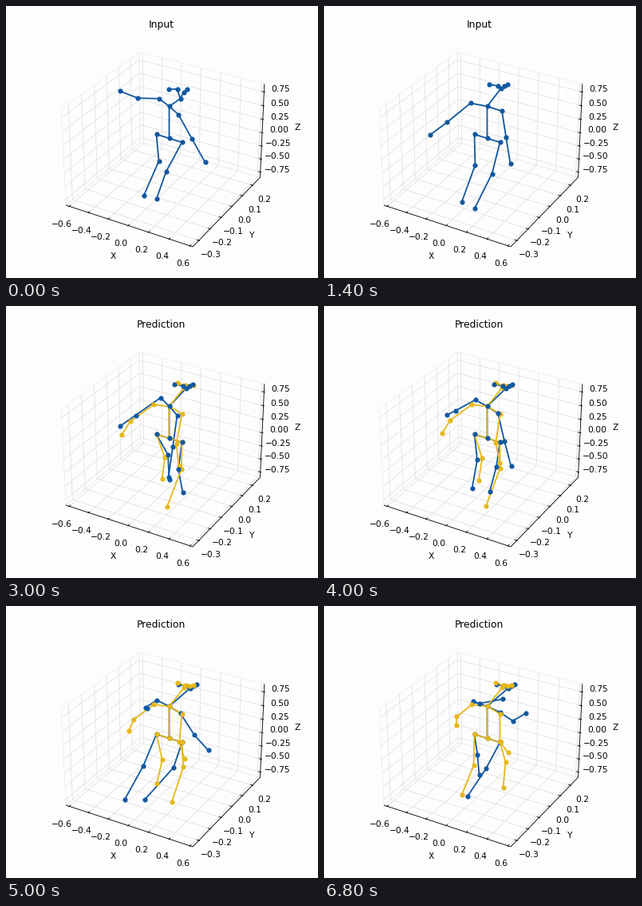
Recreate the animation shown at these times as a matplotlib script. Size 391 by 340 pixels, loop 7 s.

```python
import numpy as np
import matplotlib.pyplot as plt
from matplotlib.animation import FuncAnimation

W, H, DPI = 391, 340, 64
PT = 72 / DPI  # points per pixel
FRAMES, INTERVAL = 35, 200
FORECAST = 2.0  # seconds until the prediction starts
END = 6.8
SWAP = 4.4  # from here the predicted joints lie in front

BLUE, YELLOW = "#1158a0", "#e6b81a"
GRID, EDGE = "#e2e2e2", "#eeeeee"

plt.rcParams["font.family"] = "DejaVu Sans"
fig = plt.figure(figsize=(W / DPI, H / DPI), dpi=DPI, facecolor="#fdfdfd")
ax = fig.add_axes([0, 0, 1, 1])
ax.set_xlim(0, W)
ax.set_ylim(H, 0)
ax.axis("off")

# ---- perspective box ----
LIMITS = np.array([(-0.635, 0.625), (-0.352, 0.278), (-0.854, 0.896)])
HALF = np.array([0.5952, 0.5952, 0.4464])
elev, azim, DIST = np.radians(30), np.radians(-60), 10
TOWARD = np.array([np.cos(elev) * np.cos(azim), np.cos(elev) * np.sin(azim), np.sin(elev)])
RIGHT = np.array([-np.sin(azim), np.cos(azim), 0])
UP = np.cross(TOWARD, RIGHT)


def project(p):
    """Box coordinates in -1..1 to stage pixels."""
    q = np.asarray(p) * HALF
    k = 153 * DIST / (DIST - q @ TOWARD)
    return np.array([199 + k * (q @ RIGHT), 173.4 - k * (q @ UP)])


def segment(a, b, color, z):
    (x0, y0), (x1, y1) = project(a), project(b)
    ax.plot([x0, x1], [y0, y1], color=color, lw=0.85 * PT, zorder=z,
            solid_capstyle="butt")


def label(x, y, text):
    """Text centred on x, with its digits centred on y."""
    ax.text(x, y + 4, text, fontsize=10.6 * PT, ha="center", va="baseline")


def place(axis, value, others):
    return np.insert(np.array(others, float), axis, value)


# free axis, values, format, wall corners, tick direction, label offset
AXES = [
    (0, np.arange(-3, 4) * 0.2, ".1f", [(-1, -1), (1, -1), (1, 1)], 1, (-9, 21.3)),
    (1, np.arange(-3, 3) * 0.1, ".1f", [(1, -1), (-1, -1), (-1, 1)], 0, (15.4, 16.6)),
    (2, np.arange(-3, 4) * 0.25, ".2f", [(1, 1), (-1, 1), (-1, -1)], 0, (21, -4)),
]


def draw_axis(axis, values, fmt, walls, tick_dir, offset):
    lo, hi = LIMITS[axis]
    for a, b in zip(walls, walls[1:]):
        for end in (-1, 1):
            segment(place(axis, end, a), place(axis, end, b), EDGE, 1)
    segment(place(axis, -1, walls[0]), place(axis, 1, walls[0]), "black", 3)
    for v in values:
        points = [place(axis, 2 * (v - lo) / (hi - lo) - 1, c) for c in walls]
        for a, b in zip(points, points[1:]):
            segment(a, b, GRID, 2)
        inner, outer = points[0].copy(), points[0].copy()
        inner[tick_dir] *= 0.966
        outer[tick_dir] *= 1.017
        segment(inner, outer, "black", 3)
        label(*(project(points[0]) + offset), format(v, fmt).replace("-", "\u2212"))


for spec in AXES:
    draw_axis(*spec)
label(134, 312, "X")
label(308, 286, "Y")
label(365, 151, "Z")
title = ax.text(194.3, 27.2, "", fontsize=12.4 * PT, ha="center", va="baseline")

# ---- motion ----
BONES = [
    ("earR", "eyeR"), ("eyeR", "nose"), ("nose", "eyeL"), ("eyeL", "earL"),
    ("neck", "nose"), ("neck", "shoulderR"), ("shoulderR", "elbowR"),
    ("elbowR", "wristR"), ("neck", "shoulderL"), ("shoulderL", "elbowL"),
    ("elbowL", "wristL"), ("neck", "root"), ("root", "hipR"), ("root", "hipL"),
    ("hipR", "kneeR"), ("kneeR", "ankleR"), ("hipL", "kneeL"), ("kneeL", "ankleL"),
]
TORSO = {"neck": (205, 126), "root": (205, 166), "hipR": (189, 161), "hipL": (221, 171)}
LIMBS = [("shoulder", "elbow", "wrist"), ("hip", "knee", "ankle")]
HEAD = ["earR", "eyeR", "nose", "eyeL", "earL"]
NOD = np.array([6, 4, 13, 8, 6])  # how far each head joint dips at first

# key points of the hands and feet
TIMES = [0, 1.4, 3, 4, 5, 5.8, END]
SWINGS = {
    "wristR": [(143, 107), (133, 162), (143, 151), (154, 137), (177, 129), (202, 130), (224, 117)],
    "wristL": [(250, 196), (234, 198), (204, 215), (235, 201), (254, 181), (249, 162), (253, 135)],
    "ankleR": [(173, 238), (173, 246), (205, 218), (186, 229), (149, 243), (150, 241), (195, 212)],
    "ankleL": [(189, 242), (189, 254), (222, 234), (208, 233), (174, 243), (162, 250), (180, 239)],
}
TWIST = [-0.4, 1, -0.7, 0, 0.1, 0.3, 0.5]
KNEE = [-4, 6, -5, 2, 13, 14, 3]

# predicted hands and feet: settled place, last place, easing power
DRIFTS = {
    "wristR": ((145, 162), (166, 150), 1.3),
    "wristL": ((217, 201), (231, 184), 1),
    "ankleR": ((196, 217), (173, 237), 2),
    "ankleL": ((202, 252), (225, 228), 2),
}


def smooth(x):
    x = np.clip(x, 0, 1)
    return x * x * (3 - 2 * x)


def glide(points, t):
    """Smooth cubic through key points at TIMES."""
    points = np.array(points, float)
    slopes = np.gradient(points, TIMES, axis=0)
    i = min(np.searchsorted(TIMES, t, side="right") - 1, len(TIMES) - 2)
    h = TIMES[i + 1] - TIMES[i]
    s = (t - TIMES[i]) / h
    mix = smooth(s)
    return (points[i] * (1 - mix) + points[i + 1] * mix
            + h * s * (1 - s) * ((1 - s) * slopes[i] - s * slopes[i + 1]))


def body(ends, shoulders, bends, head):
    """Each elbow or knee is the middle of its limb, pushed out by its bend."""
    joints = {**TORSO, **shoulders, **ends, **dict(zip(HEAD, head))}
    for top, middle, end in LIMBS:
        for side in "RL":
            centre = np.add(joints[top + side], joints[end + side]) / 2
            joints[middle + side] = centre + bends[middle + side]
    return joints


def true_pose(t):
    twist = glide(TWIST, t)
    shoulders = {"shoulderR": (190 - 6 * twist, 118 + 4 * twist),
                 "shoulderL": (218.5 + 5 * twist, 135 - 3 * twist)}
    bends = {"elbowR": (-2 - 1.2 * t, 4),
             "elbowL": (0, 10 * (t / END) ** 3),
             "kneeR": (11 - 1.5 * t) * np.array([1, -0.45]),
             "kneeL": glide(KNEE, t) * np.array([1, -0.35])}
    head = np.array([(-15, -5), (-4, -3), (0, 0), (4, -3), (8, -5)], float)
    head += (219 + 2.4 * min(t, 5), 103.5)
    head[:, 1] += NOD * (1 - smooth(t / 1.4))
    ends = {name: glide(points, t) for name, points in SWINGS.items()}
    return body(ends, shoulders, bends, head)


START = true_pose(FORECAST)


def guess_pose(t):
    u = max(t - 3, 0) / (END - 3)
    left = 1 - smooth(t - FORECAST)
    ends = {}
    for name, (first, last, power) in DRIFTS.items():
        first, last = np.array(first), np.array(last)
        ends[name] = first + (last - first) * u ** power + (START[name] - first) * left
    shoulders = {"shoulderR": (185.5, 124), "shoulderL": (221, 135.5)}
    bends = {"elbowR": (-9, 2), "elbowL": (-5, 4 + 6 * u),
             "kneeR": (7, 1), "kneeL": (9 - 4 * u * u, -7 + 3 * u * u)}
    head = np.array([(-8, -6), (2, -3), (0, 0), (7, -2), (12, -3)]) + (223.5, 103)
    return body(ends, shoulders, bends, head)


class Skeleton:
    def __init__(self, color, z):
        self.bones, = ax.plot([], [], color=color, lw=1.8 * PT, zorder=z)
        self.dots, = ax.plot([], [], "o", color=color, ms=6.2 * PT, mew=0, zorder=z + 4)

    def show(self, joints):
        shift = np.array([-0.5, -0.6])
        gap = (np.nan, np.nan)
        path = np.array([p for a, b in BONES for p in (joints[a], joints[b], gap)]) + shift
        spots = np.array(list(joints.values())) + shift
        self.bones.set_data(*path.T)
        self.dots.set_data(*spots.T)

    def set_visible(self, on):
        self.bones.set_visible(on)
        self.dots.set_visible(on)


truth = Skeleton(BLUE, 5)
guess = Skeleton(YELLOW, 6)


def update(i):
    t = i * INTERVAL / 1000
    predicting = t >= FORECAST
    title.set_text("Prediction" if predicting else "Input")
    truth.show(true_pose(t))
    guess.show(guess_pose(max(t, FORECAST)))
    guess.set_visible(predicting)
    guess.dots.set_zorder(10 if t >= SWAP else 8)
    return title, truth.bones, truth.dots, guess.bones, guess.dots


anim = FuncAnimation(fig, update, frames=FRAMES, interval=INTERVAL,
                     init_func=lambda: update(0), repeat=True, repeat_delay=0)
plt.show()
```
